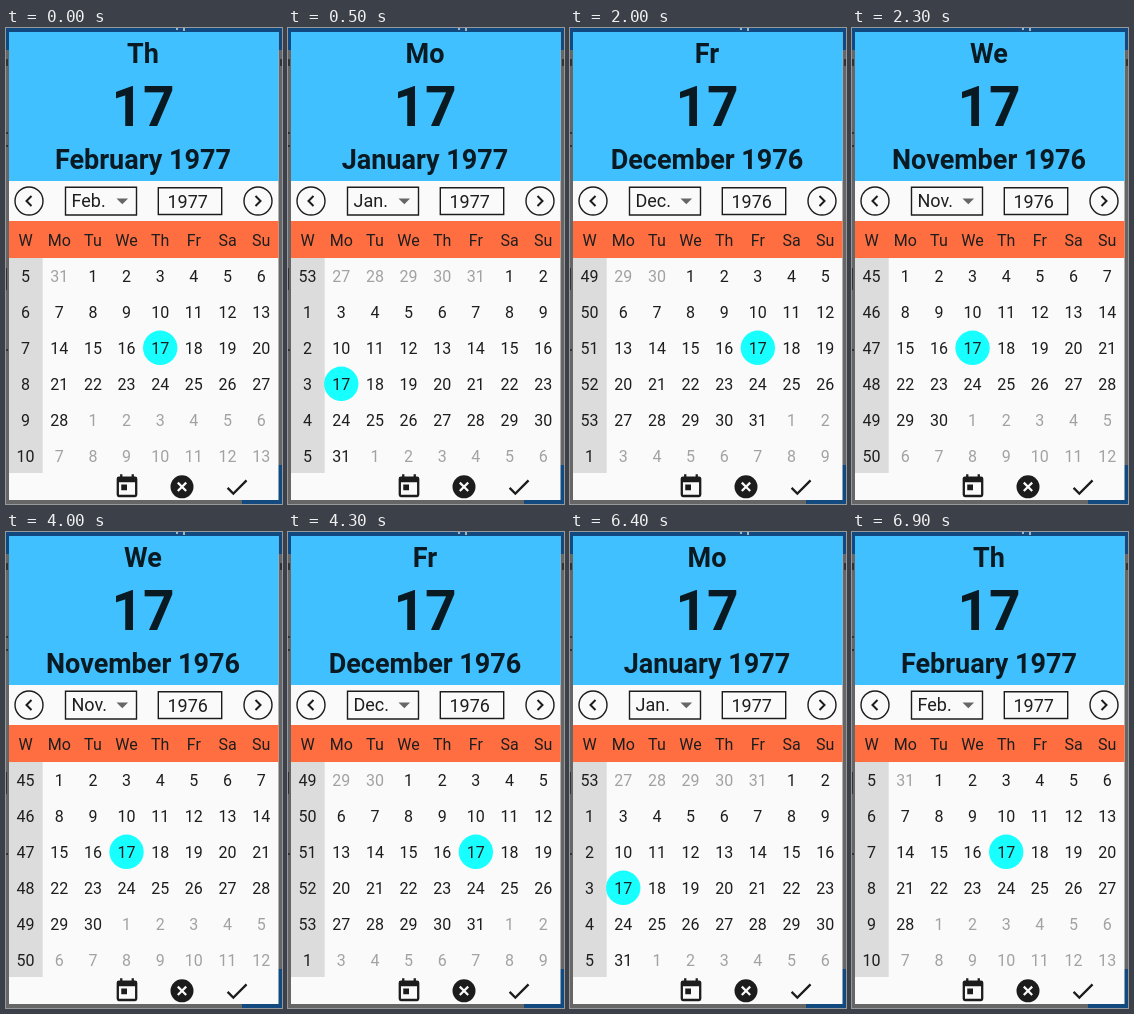
An HTML page that plays this animation: 276 px wide and 476 px high, repeating every 8 s.

```html
<!DOCTYPE html>
<html lang="en">
<head>
<meta charset="utf-8">
<title>Date picker</title>
<style>
  html, body { margin: 0; width: 276px; height: 476px; overflow: hidden; }
  svg { display: block; font: 16px Roboto, sans-serif; }
  text { fill: #1e1e1e; text-anchor: middle; }
  .title { font-weight: bold; font-size: 27px; fill: #0a1a22; }
  .big { font-size: 55px; }
  .field { font-size: 18px; text-anchor: start; }
  .dim { fill: #a2a2a2; }
  .outline { fill: none; stroke: #1c1c1c; stroke-width: 1.4; }
  .chevron { fill: none; stroke: #1c1c1c; stroke-width: 2; }
  .icon { fill: #1c1c1c; }
</style>
</head>
<body>
<svg width="276" height="476" viewBox="0 0 276 476">
  <!-- dimmed page behind the dialog -->
  <path fill="#666" d="M0 0h276v476H0z"/>
  <path fill="#124a80" d="M0 0h276v22H0zM236 437h40v39h-40z"/>
  <path fill="#a5b4c2" d="M170 0h2v2h-2zM177 0h2v3h-2z"/>
  <path fill="#333" d="M0 31h2v7H0zM0 104h2v2H0zM0 117h2v2H0zM0 240h1v22H0zM0 321h2v2H0zM274 31h2v7h-2z"/>

  <path fill="#fafafa" d="M3 4h269.5v468H3z"/>
  <path fill="#40c0ff" d="M3 4h269.5v149H3z"/>
  <path fill="#ff6e40" d="M3 193h269.5v37H3z"/>
  <path fill="#dcdcdc" d="M3 230h33.7v215H3z"/>

  <circle class="outline" cx="23" cy="173" r="14"/>
  <circle class="outline" cx="252" cy="173" r="14"/>
  <path class="chevron" d="M25.5 168l-5 5 5 5M249.5 168l5 5-5 5"/>
  <path class="outline" d="M59.5 159.2h71v27.8h-71zM152.3 159.7h63.4v26.8h-63.4z"/>
  <path fill="#666" d="M110.5 170.5h11.6l-5.8 5.8z"/>

  <path class="icon" transform="translate(107.2 445) scale(1.15)" d="M19 3h-1V1h-2v2H8V1H6v2H5Q3 3 3 5v14q0 2 2 2h14q2 0 2-2V5q0-2-2-2zm0 16H5V8h14zM7 10h5v5H7z"/>
  <circle class="icon" cx="176" cy="458.8" r="11.5"/>
  <path d="M171.8 454.6l8.4 8.4m0-8.4l-8.4 8.4" stroke="#fafafa" stroke-width="2.2"/>
  <path class="icon" transform="translate(216.8 445) scale(1.17)" d="M9 16.2L4.8 12l-1.4 1.4L9 19 21 7l-1.4-1.4z"/>
  <g id="content"></g>
</svg>
<script>
const LOOP = 8000, SELECTED = 17;
const DAYS = ['Mo', 'Tu', 'We', 'Th', 'Fr', 'Sa', 'Su'];
const MONTHS = {
  feb: { name: 'February', year: 1977, index: 1, week: 5 },
  jan: { name: 'January', year: 1977, index: 0, week: 53 },
  dec: { name: 'December', year: 1976, index: 11, week: 49 },
  nov: { name: 'November', year: 1976, index: 10, week: 45 }
};
const TIMELINE = [
  [0, 'feb'], [400, 'jan'], [1300, 'dec'], [2300, 'nov'],
  [4300, 'dec'], [5500, 'jan'], [6600, 'feb']
];

const content = document.getElementById('content');
const text = (x, y, value, cls = '') => `<text x="${x}" y="${y}" class="${cls}">${value}</text>`;
const columnX = i => 19.6 + i * 33.65;

function render({ name, year, index, week }) {
  const first = (new Date(Date.UTC(year, index, 1)).getUTCDay() + 6) % 7;
  const selectedCell = first + SELECTED - 1;
  let out = text(137, 35, DAYS[selectedCell % 7], 'title')
    + text(137, 98, SELECTED, 'title big')
    + text(137, 141, `${name} ${year}`, 'title')
    + text(65.5, 179, name.slice(0, 3) + '.', 'field')
    + text(161.5, 179.5, year, 'field')
    + ['W', ...DAYS].map((day, i) => text(columnX(i), 217.5, day)).join('');

  for (let cell = 0; cell < 42; cell++) {
    const row = Math.floor(cell / 7), column = cell % 7;
    const x = columnX(column + 1), y = 253.5 + row * 36;
    const date = new Date(Date.UTC(year, index, cell - first + 1));
    if (!column) out += text(columnX(0), y, (week + row - 1) % 53 + 1);
    if (cell === selectedCell) out += `<circle cx="${x}" cy="${y - 5.7}" r="17.2" fill="#18ffff"/>`;
    out += text(x, y, date.getUTCDate(), date.getUTCMonth() === index ? '' : 'dim');
  }
  content.innerHTML = out;
}

let shown;
function tick() {
  const time = performance.now() % LOOP;
  const key = TIMELINE.filter(([start]) => start <= time).pop()[1];
  if (key !== shown) render(MONTHS[shown = key]);
  requestAnimationFrame(tick);
}
tick();
</script>
</body>
</html>
```
